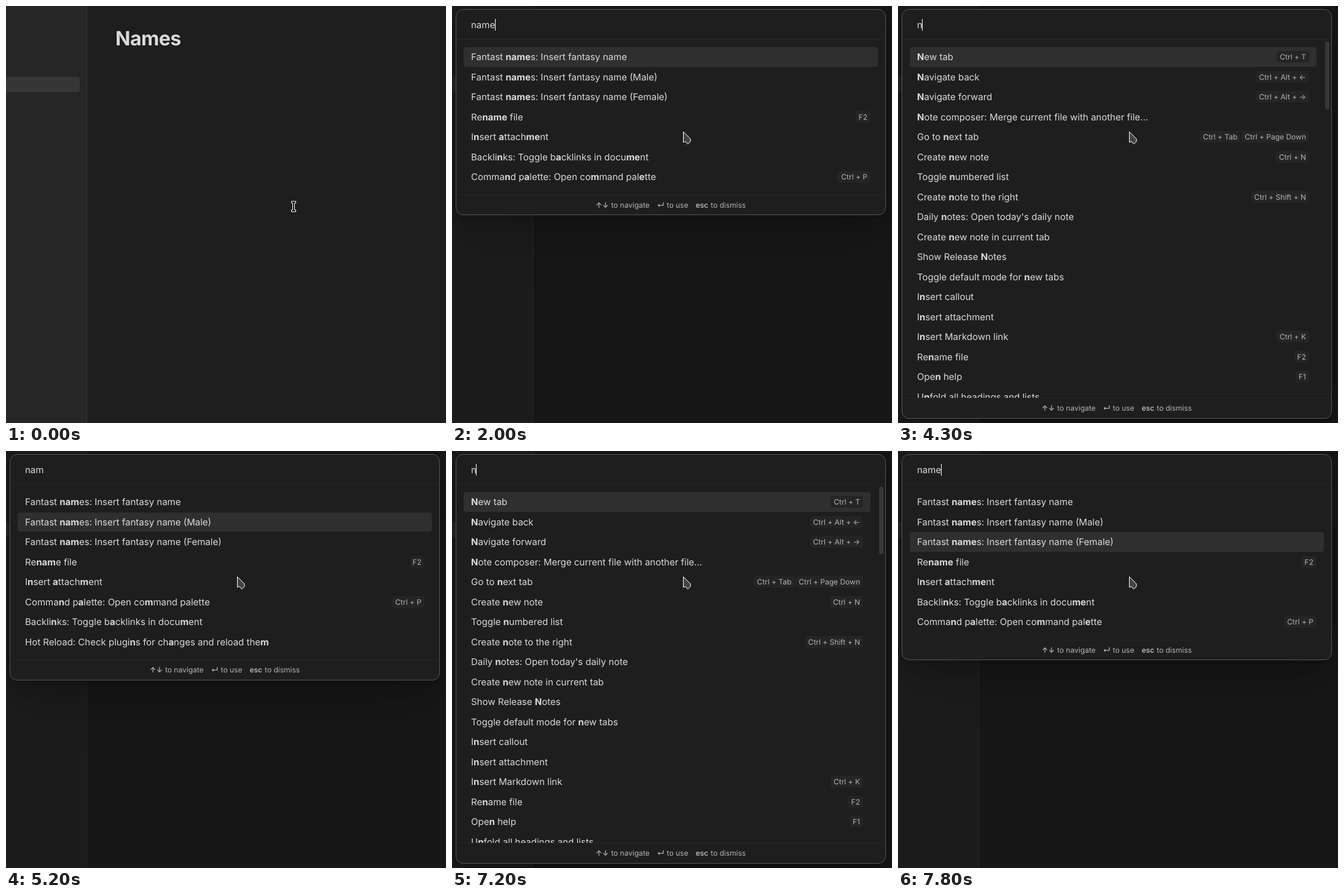
Animation of 716 by 678 pixels, one loop 8 s. Source, as an HTML page:

```html
<!DOCTYPE html>
<html lang="en">
<head>
<meta charset="utf-8">
<title>Names</title>
<style>
html, body { margin: 0; width: 100%; height: 100%; overflow: hidden; background: #1e1e1e; }
* { box-sizing: border-box; }
body { position: relative; font: 15px/19.5px Inter, sans-serif; color: #dadada; white-space: pre; text-rendering: geometricPrecision; }
.side { position: absolute; left: 0; top: 0; bottom: 0; width: 132px; background: #262626; border-right: 1px solid #363636; }
.file { position: absolute; left: 0; top: 115px; width: 120px; height: 25px; background: #363636; border-radius: 0 4px 4px 0; }
h1 { position: absolute; left: 178px; top: 33px; margin: 0; font: 700 32px/40px Inter, sans-serif; letter-spacing: -0.015em; }
#note { position: absolute; left: 178px; top: 114px; font-size: 16px; line-height: 24px; }
#note div { height: 24px; }
.caret { position: relative; }
.caret::after { content: ""; position: absolute; left: -.5px; top: 0; width: 1px; height: 20px; background: #fff; }
.cover { position: absolute; inset: 0; background: rgba(10,10,10,.34); }
.modal { position: absolute; left: 6px; top: 5px; width: 700px; max-height: 666px; display: flex; flex-direction: column;
  background: #1e1e1e; border: 1px solid #555; border-radius: 12px; overflow: hidden;
  box-shadow: 0 1.8px 7.3px rgba(0,0,0,.071), 0 6.3px 24.7px rgba(0,0,0,.112), 0 30px 90px rgba(0,0,0,.2); }
.query { flex: none; height: 49px; padding-left: 24px; line-height: 49px; border-bottom: 1px solid #262626; }
.query .caret::after { height: 19px; }
.list { position: relative; flex: 0 1 auto; min-height: 0; overflow: hidden; padding: 12px; }
.long .list { padding-right: 24px; }
.long .list::after { content: ""; position: absolute; left: 688px; top: 3px; width: 7px; height: 110px; border-radius: 4px; background: #373737; }
.row { display: flex; align-items: center; height: 31.5px; margin-bottom: 1px; padding: 0 12px; border-radius: 4px; }
.row.on { background: rgba(255,255,255,.075); }
.row span { flex: 1; }
b { font-weight: 700; }
kbd { font: 12px/15px Inter, sans-serif; color: #b3b3b3; background: #252525; border-radius: 4px; padding: 2px 5px; margin-left: 2px; }
.foot { flex: none; padding: 8px; border-top: 1px solid #262626; display: flex; justify-content: center; gap: 12px;
  font-size: 12px; line-height: 15.6px; color: #b3b3b3; }
.foot b { font-weight: 600; margin-right: 4px; }
#beam, #arrow { position: absolute; left: 0; top: 0; overflow: visible; }
</style>
</head>
<body>
<div class="side"><div class="file"></div></div>
<h1>Names</h1>
<div id="note"></div>
<div id="palette"></div>
<svg id="beam" width="10" height="20"><path d="M.5 .5H7.5V3.5H5.5V14.5H7.5V17.5H.5V14.5H2.5V3.5H.5Z" fill="#111" stroke="#fff"/></svg>
<svg id="arrow" width="14" height="22"><path d="M.5 .5V17.5L4.5 16.5L7.5 20.5L12 16.5V12Z" fill="#444" stroke="#fff" stroke-linejoin="round"/></svg>
<script>
const LOOP = 8000;
const people = ["Evangelina Harston", "Tobias Kellarden"];
const fantast = ["", " (Male)", " (Female)"].map(s => "Fantast names: Insert fantasy name" + s);
const back = "Backlinks: Toggle backlinks in document";
const command = "Command palette: Open command palette";
const merge = "Note composer: Merge current file with another file...";
const unfold = "Unfold all headings and lists";
const rename = "Rename file", attach = "Insert attachment";

const keys = {
  "New tab": ["Ctrl + T"], "Navigate back": ["Ctrl + Alt + ←"], "Navigate forward": ["Ctrl + Alt + →"],
  "Go to next tab": ["Ctrl + Tab", "Ctrl + Page Down"], "Create new note": ["Ctrl + N"],
  "Create note to the right": ["Ctrl + Shift + N"], "Insert Markdown link": ["Ctrl + K"],
  [rename]: ["F2"], "Open help": ["F1"], [command]: ["Ctrl + P"]
};

const all = ["New tab", "Navigate back", "Navigate forward", merge, "Go to next tab", "Create new note",
  "Toggle numbered list", "Create note to the right", "Daily notes: Open today's daily note",
  "Create new note in current tab", "Show Release Notes", "Toggle default mode for new tabs",
  "Insert callout", attach, "Insert Markdown link", rename, "Open help", unfold];

const results = {
  "": all,
  n: all,
  na: ["Navigate back", "Navigate forward", ...fantast, rename, "New tab", "Go to next tab", merge,
    "Daily notes: Open today's daily note", "Create new note in current tab", "Insert callout", attach,
    "Insert Markdown link", "Toggle default mode for new tabs", command, back, unfold],
  nam: [...fantast, rename, attach, command, back, "Hot Reload: Check plugins for changes and reload them"],
  name: [...fantast, rename, attach, back, command]
};

// Each step changes some fields: q = query (null when closed), row, names, line, caret.
const steps = [
  [0, { q: null, row: 0, names: 0, line: 0, caret: 0 }],
  [400, { caret: 1 }], [1000, { caret: 0 }],
  [1400, { q: "", caret: 1 }], [1800, { q: "n" }], [1900, { q: "na" }], [2000, { q: "name" }],
  [2600, { q: null }], [2700, { names: 1 }], [3300, { caret: 0 }], [3400, { line: 1, caret: 1 }],
  [3900, { q: "" }], [4300, { q: "n" }], [4400, { q: "na" }], [4500, { q: "nam" }],
  [5100, { caret: 0 }], [5200, { row: 1 }],
  [5500, { q: null, row: 0, caret: 1 }], [5600, { names: 2 }], [6200, { caret: 0 }], [6300, { line: 2, caret: 1 }],
  [6700, { q: "" }], [7200, { q: "n" }], [7300, { q: "na" }], [7400, { q: "name" }],
  [7700, { row: 1 }], [7800, { row: 2 }]
];

const $ = id => document.getElementById(id);
const caret = on => on ? '<span class="caret">\u200b</span>' : "";

// Whole match first, otherwise the letters one after another.
function mark(text, q) {
  const low = text.toLowerCase(), at = low.indexOf(q), hits = new Set();
  let from = 0;
  [...q].forEach((c, i) => {
    const p = at >= 0 ? at + i : low.indexOf(c, from);
    hits.add(p);
    from = p + 1;
  });
  return [...text].map((c, i) => hits.has(i) ? `<b>${c}</b>` : c).join("").replaceAll("</b><b>", "");
}

function palette(s) {
  const list = results[s.q];
  const rows = list.map((text, i) => `<div class="row${i === s.row ? " on" : ""}"><span>${mark(text, s.q)}</span>` +
    (keys[text] || []).map(k => `<kbd>${k}</kbd>`).join("") + "</div>").join("");
  return `<div class="cover"></div><div class="modal${list.length > 10 ? " long" : ""}">` +
    `<div class="query">${s.q}${caret(s.caret)}</div><div class="list">${rows}</div>` +
    '<div class="foot"><span><b>↑↓</b>to navigate</span><span><b>↵</b>to use</span><span><b>esc</b>to dismiss</span></div></div>';
}

function note(s) {
  return [0, 1, 2].map(i => `<div>${i < s.names ? people[i] : ""}` +
    `${caret(s.caret && s.q === null && i === s.line)}</div>`).join("");
}

let shown = "";
function draw() {
  const t = performance.now() % LOOP;
  const s = Object.assign({}, ...steps.filter(p => p[0] <= t).map(p => p[1]));
  const key = JSON.stringify(s);
  if (key !== shown) {
    shown = key;
    $("note").innerHTML = note(s);
    $("palette").innerHTML = s.q === null ? "" : palette(s);
  }
  const open = s.q !== null;
  const k = Math.min(2, Math.floor(t / 100)) / 2;
  $("beam").style.display = open ? "none" : "";
  $("arrow").style.display = open ? "" : "none";
  $("beam").style.transform = `translate(${464 - 90 * k}px, ${317 - 122 * k}px)`;
  $("arrow").style.transform = "translate(376px, 204px)";
  requestAnimationFrame(draw);
}
draw();
</script>
</body>
</html>
```
